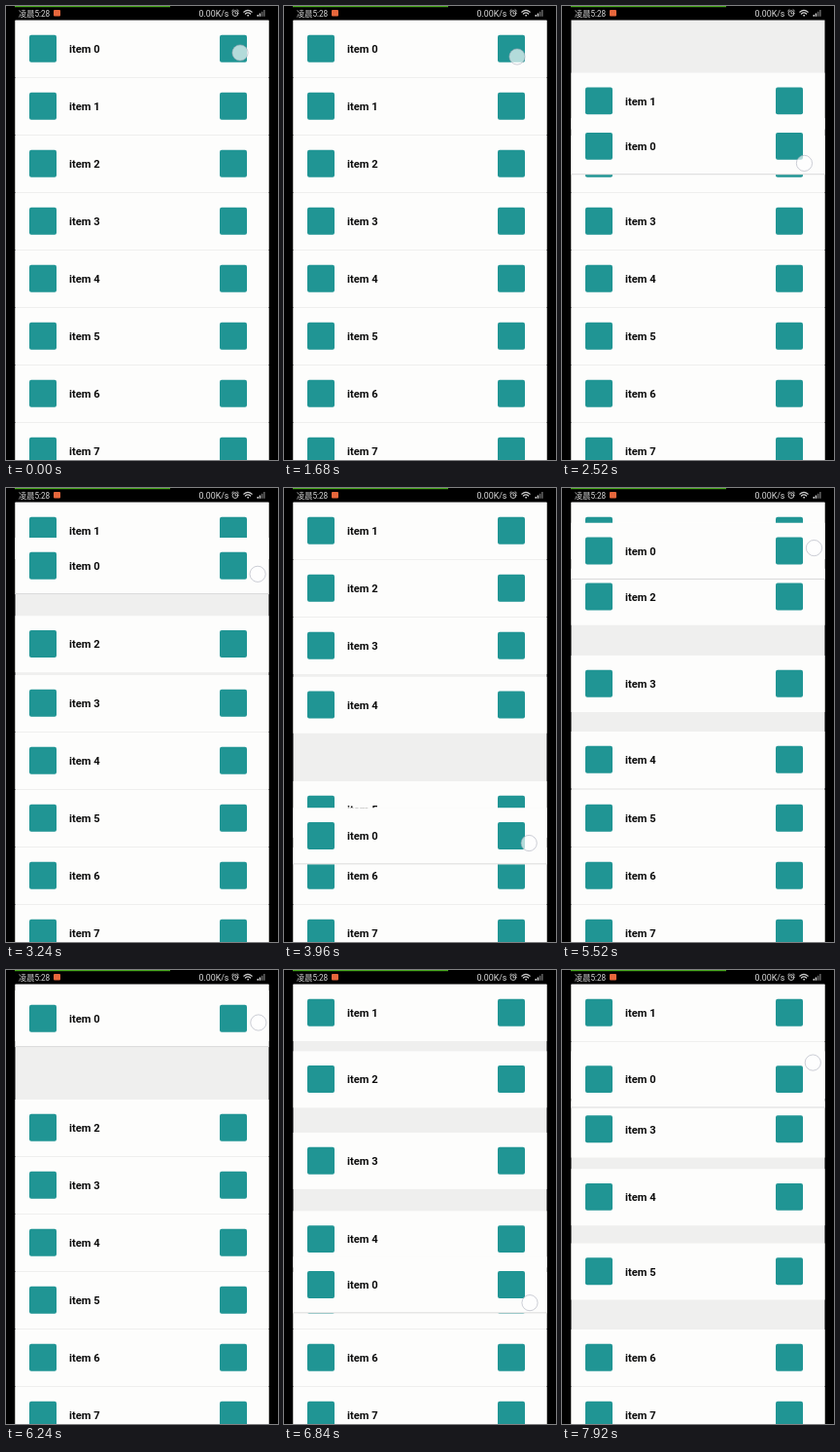
Animation of 280 by 466 pixels, one loop 8040 ms. Source, as an HTML page:

```html
<!DOCTYPE html>
<html lang="en">
<head>
<meta charset="utf-8">
<title>Drag to reorder</title>
<style>
  html, body { margin: 0; width: 100%; height: 100%; overflow: hidden; background: #000; }
  svg { display: block; width: 100%; height: 100%; }
  .label { font: 700 11.2px Roboto, sans-serif; fill: #0c0c0c; }
  .status { font: 8.2px Roboto, "Noto Sans CJK SC", "Noto Sans CJK", sans-serif; fill: #d8d8d8; }
  .rate { font-size: 8.8px; }
</style>
</head>
<body>
<svg viewBox="0 0 280 466">
  <rect x="9.5" y="14" width="261" height="452" fill="#efefee"/>
  <g id="list"></g>
  <circle id="touch" r="8.1" fill="#fff" fill-opacity=".66" stroke="#a3a6b4" stroke-opacity=".55"/>
  <path d="M0 0H280V14.5H0ZM0 0H9V466H0ZM271 0H280V466H271Z"/>
  <rect x="9" width="160" height="1.2" fill="#46a51c"/>
  <text class="status" x="13" y="10.5">凌晨5:28</text>
  <rect x="49" y="4" width="7" height="6.5" rx="1" fill="#e8673c"/>
  <text class="status rate" x="198.5" y="10.5">0.00K/s</text>
  <g fill="none" stroke="#d2d2d2" stroke-width=".9" stroke-linecap="round">
    <circle cx="236" cy="7.6" r="2.9"/>
    <path d="M236 6V7.8H237.3M232.6 5L234 3.8M239.4 5L238 3.8"/>
    <path d="M244.8 6.2Q249 2.6 253.2 6.2M246.4 8Q249 5.8 251.6 8" stroke-width="1.2"/>
    <circle cx="249" cy="9.8" r=".5"/>
  </g>
  <path d="M258.5 10.8V9H260V10.8ZM260.7 10.8V7.6H262.2V10.8Z" fill="#d2d2d2"/>
  <path d="M262.9 10.8V5.8H264.4V10.8ZM265.1 10.8V4H266.6V10.8Z" fill="#666"/>
</svg>
<script>
const LOOP = 8040, STEP = 120, PITCH = 59, FIRST = 44, COUNT = 8;
const SETTLE = 250, DELAY = 20, LAG = 22;

// Strokes of the finger: when each starts and ends, and how far below its slot the row then is.
const strokes = [
  { start: 2275, end: 2706, to: 165 },
  { start: 2750, end: 3120, to: 24 },
  { start: 3120, end: 4050, to: 320 },
  { start: 4969, end: 5609, to: 6 },
  { start: 6383, end: 7027, to: 345 },
  { start: 7605, end: 8051, to: 0 }
];
const lift = strokes[0].start;

const ease = p => (1 - Math.cos(Math.PI * Math.min(1, Math.max(0, p)))) / 2;
const ramp = (t, start, length) => ease((t - start) / length);

// Each move takes over from wherever the previous one has got to.
function follow(moves, t) {
  let y = 0;
  for (const m of moves) if (t >= m.start) y += (m.to - y) * ramp(t, m.start, m.end - m.start);
  return y;
}

const drag = t => follow(strokes, t);

// A neighbour moves up once the dragged row is past it, and back down on return.
function planMoves(k) {
  const moves = [];
  let up = false;
  for (let t = 0; t < LOOP; t++) {
    const y = drag(t);
    if (up ? y <= PITCH * (k - 1) : y >= PITCH * k) {
      up = !up;
      moves.push({ start: t + DELAY, end: t + DELAY + SETTLE, to: up ? -PITCH : 0 });
    }
  }
  return moves;
}

function make(parent, tag, attrs, text) {
  const el = document.createElementNS("http://www.w3.org/2000/svg", tag);
  for (const name in attrs) el.setAttribute(name, attrs[name]);
  if (text) el.textContent = text;
  return parent.appendChild(el);
}

const list = document.getElementById("list");
const touch = document.getElementById("touch");

function makeRow(k) {
  const g = make(list, "g", {});
  make(g, "rect", { x: 9.5, y: -29, width: 261, height: 58, fill: "#fdfdfc" });
  for (const x of [24, 220]) make(g, "rect", { x, y: -14.2, width: 28, height: 27.9, rx: 2, fill: "#209594" });
  make(g, "text", { x: 65, y: 4, class: "label" }, "item " + k);
  return g;
}

const rows = [];
for (let k = COUNT - 1; k >= 0; k--) rows[k] = { el: makeRow(k), moves: k ? planMoves(k) : strokes };
const edge = make(rows[0].el, "rect", { x: 9.5, y: 28.2, width: 261, height: 0.9, fill: "#d6d6d6" });

function draw(t) {
  rows.forEach(({ el, moves }, k) => {
    el.setAttribute("transform", `translate(0 ${(FIRST + PITCH * k + follow(moves, t)).toFixed(2)})`);
  });
  edge.setAttribute("opacity", t < lift ? 0 : 1);

  // The finger settles during the long press, then runs ahead of the row and swings out to the right.
  const y = drag(t);
  const press = ramp(t, 600, 720) - ramp(t, lift - 75, 400);
  const lead = (drag(t + 5) - drag(t - 5)) / 10 * LAG;
  const swing = ramp(t, lift, 480) * (19 - y / 40);
  touch.setAttribute("cx", (241 - press + swing).toFixed(2));
  touch.setAttribute("cy", (FIRST + 4 + 4 * press + y + lead).toFixed(2));
}

const begin = performance.now();
function tick() {
  const t = (performance.now() - begin) % LOOP;
  draw(Math.floor(t / STEP) * STEP);
  requestAnimationFrame(tick);
}
tick();
</script>
</body>
</html>
```
